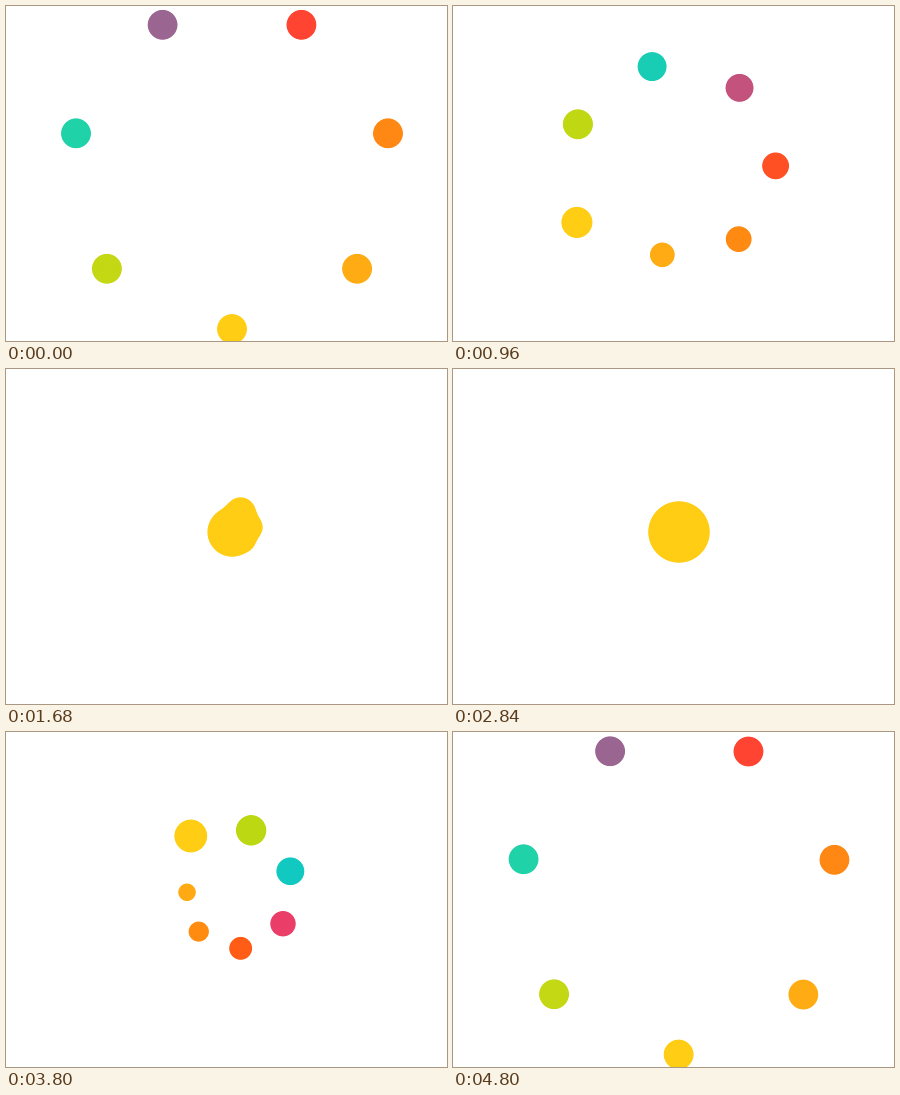
Animation of 441 by 335 pixels, one loop 5040 ms. Source, as an HTML page:

```html
<!DOCTYPE html>
<html lang="en">
<head>
<meta charset="utf-8">
<title>Gooey dots</title>
<style>
  html, body { margin: 0; width: 100%; height: 100%; overflow: hidden; background: #fff; }
  svg { display: block; }
</style>
</head>
<body>
<svg width="441" height="335" viewBox="0 0 441 335">
  <defs>
    <filter id="goo" filterUnits="userSpaceOnUse" x="-40" y="-40" width="521" height="415"
            color-interpolation-filters="sRGB">
      <feGaussianBlur stdDeviation="5"/>
      <feColorMatrix values="1 0 0 0 0  0 1 0 0 0  0 0 1 0 0  0 0 0 14 -5.52"/>
    </filter>
  </defs>
  <g id="dots" filter="url(#goo)"></g>
</svg>
<script>
const LOOP = 5040, STEP = 40;
const CX = 226, CY = 163, ORBIT = 160, TURN = 208;
const COUNT = 7, DOT_R = 14.8, CORE_R = 30.5;

// Colours on the rim and near the middle, in the order the dots are absorbed.
const RIM = "#ffac14 #ff8814 #ff4432 #9a6691 #20d2a8 #c4d814 #ffcd14".split(" ").map(parse);
const INNER = "#ffaa14 #ff8c10 #ff5c16 #ea3e68 #11c9c0 #bcd812 #ffcd14".split(" ").map(parse);
const YELLOW = RIM[COUNT - 1];

function parse(hex) {
  const n = parseInt(hex.slice(1), 16);
  return [n >> 16, n >> 8 & 255, n & 255];
}

const clamp = x => Math.min(1, Math.max(0, x));
const lerp = (a, b, x) => a + (b - a) * x;
const mix = (a, b, x) => a.map((v, i) => lerp(v, b[i], x));

// Ease in with power a, ease out with power b, meeting halfway.
function easeInOut(x, a, b) {
  x = clamp(x);
  return x < 0.5 ? (2 * x) ** a / 2 : 1 - (2 - 2 * x) ** b / 2;
}

const group = document.getElementById("dots");
function addCircle() {
  const c = document.createElementNS("http://www.w3.org/2000/svg", "circle");
  group.append(c);
  return c;
}
const dots = RIM.map(addCircle);
const core = addCircle();

function place(el, x, y, r, color) {
  el.setAttribute("cx", x);
  el.setAttribute("cy", y);
  el.setAttribute("r", r);
  el.setAttribute("fill", `rgb(${color.map(Math.round)})`);
}

function draw(t) {
  // The way out mirrors the way in.
  const time = Math.max(0, t < LOOP / 2 ? t - 16 : 4999 - t);
  const spin = easeInOut(time / 2145, 4, 4);
  const firstPull = easeInOut(time / 1950, 3, 2.2);
  const lastPull = easeInOut(time / 2290, 3, 2.2);
  const tint = clamp((spin / 0.7) ** 0.8);
  let absorbed = 0;

  dots.forEach((dot, k) => {
    const order = k / (COUNT - 1);
    const dist = ORBIT * (1 - lerp(firstPull, lastPull, order));
    const angle = (90 - 360 / COUNT * (k + 1) + TURN * spin) * Math.PI / 180;
    const size = (DOT_R + lerp(-8, 2, order) * spin) * Math.min(1, 0.4 + dist / 42);
    const color = mix(mix(RIM[k], INNER[k], tint), YELLOW, clamp((32 - dist) / 10));
    place(dot, CX + dist * Math.cos(angle), CY + dist * Math.sin(angle), size, color);
    absorbed += clamp(1 - dist / 36) / COUNT;
  });

  place(core, CX, CY, CORE_R * Math.sqrt(absorbed), YELLOW);
}

function tick() {
  const t = performance.now() % LOOP;
  draw(Math.floor(t / STEP) * STEP);
  requestAnimationFrame(tick);
}
tick();
</script>
</body>
</html>
```
